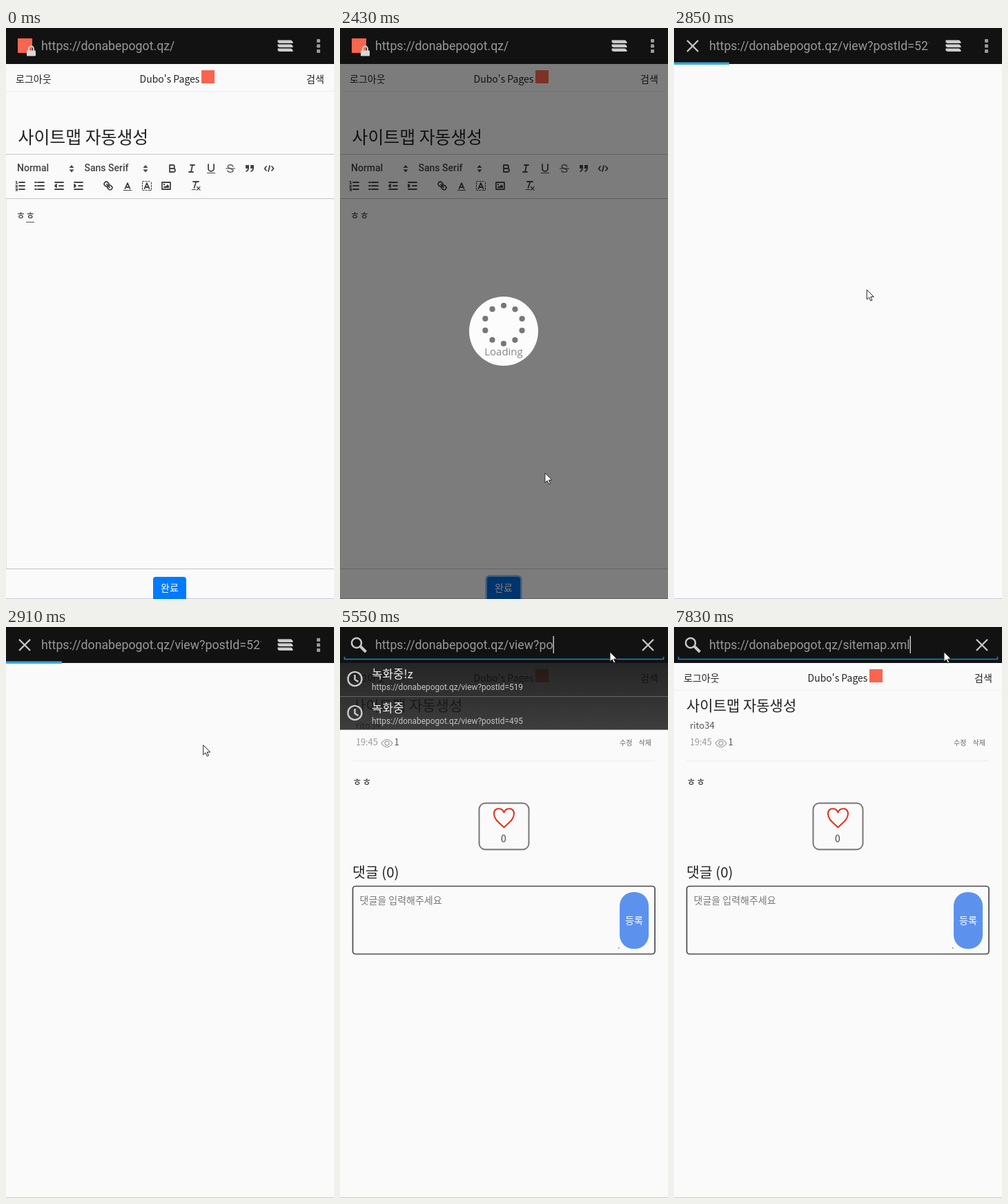
Animation of 475x825 px, one loop 8000 ms. Source, as an HTML page with a canvas:

```html
<!DOCTYPE html>
<html lang="ko">
<head>
<meta charset="utf-8">
<title>Board</title>
<style>
html, body { margin: 0; width: 100%; height: 100%; overflow: hidden; background: #fafafa; }
canvas { display: block; width: 475px; height: 825px; }
</style>
</head>
<body>
<canvas id="stage"></canvas>
<script>
const W = 475, H = 825, LOOP = 8000, BAR = 52;
const canvas = document.getElementById('stage');
const dpr = window.devicePixelRatio || 1;
canvas.width = W * dpr;
canvas.height = H * dpr;
const c = canvas.getContext('2d');

const KR = '"Noto Sans CJK KR", "Noto Sans CJK", sans-serif';
const UI = 'Roboto, "Noto Sans CJK KR", sans-serif';
const SITE = 'https://donabepogot.qz';
const BOARD = "Dubo's Pages";
const TITLE = '사이트맵 자동생성';
const VIEW = 'view?postId=521', MAP = 'sitemap.xml';

// Moments of each key press in the address bar
const DELETES = [...Array.from({ length: 8 }, (_, i) => 4950 + i * 85),
  5640, 5670, 5730, 5760, 5790, 6030, 6240];
const TYPES = [6390, 6570, 6750, 6960, 7260, 7305, 7350, 7500, 7590, 7680, 7830];

// Pointer path: time, x, y
const PATH = [[660, 476, 560], [1050, 243, 806], [2340, 243, 806], [2400, 276, 700],
  [2430, 297, 644], [2580, 279, 500], [2700, 276, 487], [2820, 276, 487], [2910, 285.5, 171],
  [3150, 335, 84], [3840, 396, 33], [4560, 396, 33], [4680, 391, 36]];

const rect = (x, y, w, h, color) => { c.fillStyle = color; c.fillRect(x, y, w, h); };
const count = (times, t) => times.filter(x => t >= x).length;
const ramp = (t, a, b) => Math.min(1, Math.max(0, (t - a) / (b - a)));

function text(s, x, y, size, color, font = KR, align = 'left', weight = 400) {
  c.font = `${weight} ${size}px ${font}`;
  c.fillStyle = color;
  c.textAlign = align;
  c.fillText(s, x, y);
}

function round(x, y, w, h, r, fill, stroke, lw) {
  c.beginPath();
  c.roundRect(x, y, w, h, r);
  if (fill) { c.fillStyle = fill; c.fill(); }
  if (stroke) { c.strokeStyle = stroke; c.lineWidth = lw; c.stroke(); }
}

function disc(x, y, r, color) {
  c.fillStyle = color;
  c.beginPath();
  c.arc(x, y, r, 0, 7);
  c.fill();
}

// Draws path data with its origin at x, y
function path(d, x, y, stroke, lw, fill) {
  c.save();
  c.translate(x, y);
  const p = new Path2D(d);
  if (fill) { c.fillStyle = fill; c.fill(p); }
  if (stroke) { c.strokeStyle = stroke; c.lineWidth = lw; c.stroke(p); }
  c.restore();
}

// Toolbar icons on an 18 px grid: centre, strokes, thin strokes, fills
const LETTER_A = 'M5.5 13L9 5L12.5 13M6.4 11H11.6';
const ICONS = [
  [241, 203, 'M5 4H9.5A2.5 2.5 0 0 1 9.5 9H5ZM5 9H10.5A2.5 2.5 0 0 1 10.5 14H5Z'],
  [269, 203, 'M7 4H13M5 14H11M8 14L10 4'],
  [297, 203, 'M5 3V9A4 4 0 0 0 13 9V3', '', 'M3 15H15V16H3Z'],
  [325, 203, '', 'M2.5 9H15.5M12.8 6.2C12 2.8 5 2.8 5.2 6.2S13 9 13 11.8S6 15.5 4.8 12'],
  [353, 203, 'M7 8C7 12 4 13 4 13M14 8C14 12 11 13 11 13', '', 'M3 4H8V9H3ZM10 4H15V9H10Z'],
  [381, 203, 'M5 6L2.5 9L5 12M13 6L15.5 9L13 12M10 5L8 13'],
  [21, 228, 'M7 4H15M7 9H15M7 14H15', 'M2 3L3.5 2.5V6M2 6H5M2 8.5H4.5L2 11H5M2 13H4.5V16H2M2.5 14.5H4.5'],
  [49, 228, 'M6 4H15M6 9H15M6 14H15M2 4H4M2 9H4M2 14H4'],
  [77, 228, 'M3 14H15M3 4H15M9 9H15M5 7V11L3 9Z'],
  [105, 228, 'M3 14H15M3 4H15M9 9H15M3 7V11L5 9Z'],
  [148, 228, 'M7 7L11 11M8.9 4.6a3.5 3.5 0 0 1 .4 4.7A3.5 3.5 0 0 1 4.6 8.9C3.2 7.5 2 6.4 4.2 4.2S7.5 3.2 8.9 4.6Z' +
    'M13.4 9.1a3.5 3.5 0 0 0-4.7-.4 3.5 3.5 0 0 0 .4 4.7c1.4 1.4 2.5 2.5 4.7 .4S14.8 10.5 13.4 9.1Z'],
  [176, 228, LETTER_A, '', 'M3 15H15V16H3Z'],
  [204, 228, LETTER_A, 'M3 2.5H5M7 2.5H9M11 2.5H13M3 15.5H5M7 15.5H9M11 15.5H15M2.5 4V6M2.5 8V10M2.5 12V14M15.5 4V6M15.5 8V10M15.5 12V14'],
  [232, 228, 'M3 4H15V14H3Z', '', 'M5 12V11L7 9L8 10L11 7L13 9V12ZM5 6H7V8H5Z'],
  [275, 228, 'M5 3H13M6.5 12L9.4 3', 'M10.5 10.5L15 15M15 10.5L10.5 15', 'M3 14H9V15H3Z']
];

function blank() {
  rect(0, BAR, W, H - BAR, '#fafafa');
  rect(0, 824, W, 1, '#c9c9de');
}

function header() {
  blank();
  text('로그아웃', 14, 79, 14, '#222');
  text(BOARD, 193.5, 79, 14, '#222');
  rect(283, 61, 19, 19, '#f9654f');
  text('검색', 435, 79, 14, '#222');
  rect(0, 91, W, 1, '#eee');
}

function editor(t) {
  const pressed = t >= 1080;
  header();
  text(TITLE, 17.5, 167, 24.9, '#222');
  for (const y of [182, 246, 781]) rect(0, y, W, 1, '#c6c6c6');
  rect(0, 247, 1, 534, '#e6e6e6');
  text('Normal', 16, 207, 14, '#444', UI, 'left', 500);
  text('Sans Serif', 113.5, 207, 14, '#444', UI, 'left', 500);
  for (const x of [95, 202]) path('M-3.5 -1L0 -5L3.5 -1ZM-3.5 1.5L0 5.5L3.5 1.5Z', x, 203, '', 0, '#444');
  c.lineCap = c.lineJoin = 'round';
  for (const [x, y, d, thin, fill] of ICONS) {
    path(d, x - 9, y - 9, '#444', 1.8);
    if (thin) path(thin, x - 9, y - 9, '#444', 1.2);
    if (fill) path(fill, x - 9, y - 9, '', 0, '#444');
  }
  c.lineCap = 'butt';
  text('ㅎㅎ', 14.5, 276, 15, '#333');
  if (!pressed) rect(29, 280, 12, 1, '#555');
  if (pressed) round(210.5, 790.5, 53, 39, 6, 'rgba(0,123,255,.5)');
  round(213, 793, 48, 36, 4, pressed ? '#0069d9' : '#007bff');
  text('완료', 237, 814, 14, '#fff', KR, 'center');
}

function loading(t) {
  rect(0, BAR, W, H - BAR, 'rgba(0,0,0,.5)');
  disc(237, 438, 50, '#fcfcfc');
  const turn = Math.max(0, t - 1620) / 270;
  for (let i = 0; i < 10; i++) {
    const a = (i + turn) * Math.PI / 5;
    disc(237 + 28 * Math.sin(a), 428.5 - 27.5 * Math.cos(a), 4.1, '#777');
  }
  text('Loading', 237, 473, 15, '#858585', '"Open Sans", sans-serif', 'center');
}

function post() {
  header();
  text(TITLE, 18, 121, 21, '#222');
  text('rito34', 23, 146.5, 13, '#555');
  text('19:45', 23, 171, 12.7, '#999');
  path('M60 168Q68 157 76 168Q68 179 60 168ZM71 168A3 3 0 1 1 71 167.9Z', 0, 0, '#999', 1.2);
  text('1', 78.5, 171, 13, '#555');
  text('수정', 405, 170.5, 10, '#666');
  text('삭제', 432.5, 170.5, 10, '#666');
  rect(18, 193, 438, 1, '#ececec');
  text('ㅎㅎ', 18, 229, 15, '#333');
  round(201.5, 254.5, 72, 67, 9, '', '#777', 2);
  path('M237.5 289.5C231 283 223 278 223 270C223 260.5 234.5 260 237.5 268C240.5 260 252 260.5 252 270C252 278 244 283 237.5 289.5Z',
    0, 0, '#e62c16', 2);
  text('0', 237, 311, 14, '#444', KR, 'center');
  text('댓글 (0)', 18, 362, 20.5, '#222');
  round(18.5, 374.5, 437.5, 98, 4, '', '#4a4a4a', 1.7);
  text('댓글을 입력해주세요', 28.5, 400, 14, '#777');
  round(405, 383, 42, 82, 20, '#5c92ee');
  text('등록', 426, 429, 14, '#fff', KR, 'center');
  rect(403, 463, 1.5, 1.5, '#777');
}

function cross(x, y) {
  path('M-8 -8L8 8M8 -8L-8 8', x, y, '#c8c8c8', 2.3);
}

function favicon() {
  rect(17, 15, 21, 21, '#f9654f');
  path('M33 33V30A3.5 3.5 0 0 1 40 30V33', 0, 0, '#d0d0d0', 2);
  round(30, 32.5, 13, 8, 1, '#d8d8d8');
}

function suggestions(t) {
  const alpha = Math.min(ramp(t, 4860, 4980), 1 - ramp(t, 6570, 6720));
  if (!alpha) return;
  const first = ['녹화중!z', SITE + '/view?postId=519'];
  const rows = t < 6240
    ? [first, ['녹화중', SITE + '/view?postId=495']]
    : [[BOARD, SITE + '/'], first];
  c.globalAlpha = alpha;
  const g = c.createLinearGradient(0, BAR, 0, 148);
  g.addColorStop(0, 'rgba(14,14,14,.9)');
  g.addColorStop(1, 'rgba(30,30,30,.86)');
  rect(0, BAR, W, 148.5 - BAR, g);
  rect(0, 100, W, 1, '#666');
  rows.forEach(([name, link], i) => {
    const y = 75 + 49 * i;
    path('M10 0A10 10 0 1 1 10 -.01ZM0 -6V1L5 4', 21.5, y, '#ccc', 2.4);
    text(name, 46, y - 1, 16.8, '#f2f2f2');
    text(link, 46, y + 16, 11.9, '#c4c4c4', UI);
  });
  c.globalAlpha = 1;
}

function addressBar(t) {
  const loads = t >= 2850 && t < 3400, focused = t >= 3990, typing = t >= 4830;
  rect(0, 0, W, BAR, '#121212');
  let s = SITE + '/';
  if (t >= 6390) s += MAP.slice(0, count(TYPES, t));
  else if (t >= 2850) s += VIEW.slice(0, VIEW.length - count(DELETES, t));
  if (typing) {
    path('M31 23A7 7 0 1 1 31 22.99Z', 0, 0, '#c8c8c8', 2.4);
    path('M29.5 28L37.5 36', 0, 0, '#c8c8c8', 4);
    cross(446, 26);
  } else if (focused) {
    path('M35.5 22.5A8.3 8.3 0 1 0 36 28.5', 0, 0, '#ccc', 3);
    path('M37.5 16.5V25H29Z', 0, 0, '', 0, '#ccc');
  } else if (loads) cross(27, 26);
  else favicon();

  c.font = `400 17.75px ${UI}`;
  const w = c.measureText(s).width;
  const selected = t >= 4110 && !typing;
  if (selected) rect(51, 14, w + 1, 24, '#1e5874');
  c.save();
  c.beginPath();
  c.rect(51, 0, focused ? 380 : 319, BAR);
  c.clip();
  text(s, 51, 32, 17.75, selected ? '#9fb4be' : '#999', UI);
  c.restore();
  if (typing) rect(51 + w, 13, 1.3, 25, '#ddd');

  if (focused) path('M6.5 43V46.5H468.5V43', 0, 0, '#1f86b8', 1.6);
  if (t < 4050) {
    // stacked tabs and menu dots
    for (const y of [29, 23, 17]) path(`M393 ${y}H413L416 ${y + 3}V${y + 5.5}H396L393 ${y + 4}Z`, 0, 0, '#121212', 1, '#ccc');
    for (const y of [16, 23.5, 31]) round(450, y, 5, 5, 1, '#999');
  }
  if (loads) rect(0, 49.5, 80 + 395 * ramp(t, 2910, 3390), 3.5, '#35a8dc');
}

function dialog(t) {
  c.globalAlpha = ramp(t, 2550, 2640);
  rect(0, 0, W, H, 'rgba(0,0,0,.6)');
  c.shadowColor = 'rgba(0,0,0,.7)';
  c.shadowBlur = 8;
  c.shadowOffsetY = 2;
  rect(33, 322, 408, 182.5, '#282828');
  c.shadowColor = 'transparent';
  text(`'${SITE}' 페이지 내용:`, 50, 360, 22, '#35a9dd', UI);
  rect(33, 383.5, 408, 2.5, '#339fd2');
  text('글이 등록되었습니다!', 50, 413.5, 18.2, '#f0f0f0');
  rect(33, 449, 408, 55.5, t >= 2730 ? '#515151' : '#282828');
  rect(33, 449, 408, 1, '#555');
  text('확인', 237, 484, 14.5, '#f4f4f4', KR, 'center');
  c.globalAlpha = 1;
}

function pointer(t) {
  if (t < PATH[0][0]) return;
  const i = PATH.findIndex(p => p[0] > t);
  let [, x, y] = PATH[PATH.length - 1];
  if (i > 0) {
    const [t0, x0, y0] = PATH[i - 1], [t1, x1, y1] = PATH[i];
    const k = ramp(t, t0, t1);
    x = x0 + (x1 - x0) * k;
    y = y0 + (y1 - y0) * k;
  }
  path('M0 0V14L3.3 11L5.5 16L7.7 15L5.5 10.2H10Z', x, y, '#222', 1, '#fff');
}

function draw(now) {
  const t = now % LOOP;
  c.setTransform(dpr, 0, 0, dpr, 0, 0);
  if (t < 2850) {
    editor(t);
    if (t >= 1200) loading(t);
  } else if (t < 3150) blank();
  else post();
  addressBar(t);
  suggestions(t);
  if (t >= 2550 && t < 2850) dialog(t);
  pointer(t);
  requestAnimationFrame(draw);
}
draw(performance.now());
</script>
</body>
</html>
```
